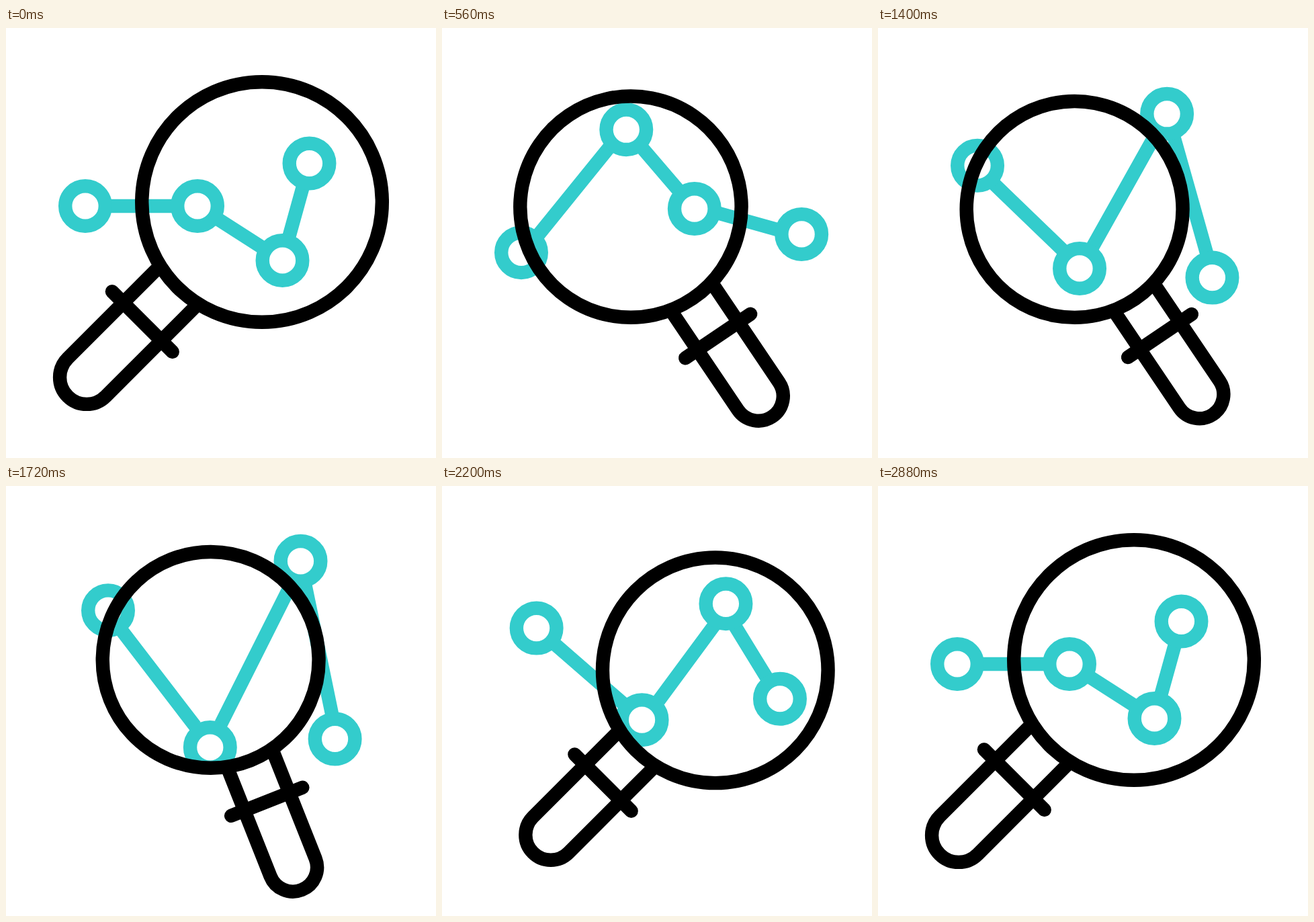
An HTML page without scripts for the animation above (3 s loop, 640 by 640 pixels).

```html
<!DOCTYPE html>
<html lang="en">
<head>
<meta charset="utf-8">
<title>Chart under a magnifier</title>
<style>
  html, body { margin: 0; width: 100%; height: 100%; overflow: hidden; background: #fff; }
  svg { display: block; width: 100vw; height: 100vh; }

  .links, .dot { stroke: #33cccc; stroke-width: 20.4; }
  .links, .dots { fill: none; }
  .dot { fill: #fff; }
  .lens { fill: none; stroke: #000; stroke-width: 20.4; stroke-linecap: round; }
  .lens * { vector-effect: non-scaling-stroke; }
  .lens .grip { fill: #fff; stroke-linecap: butt; }

  .dots, .links, .x, .y, .turn, .size {
    animation: 3s cubic-bezier(.333, 0, .667, 1) infinite;
  }
  .dots { animation-name: dots; }
  .links { animation-name: links; }
  .x { animation-name: x; }
  .y { animation-name: y; }
  .turn { animation-name: turn; }
  .size { animation-name: size; }

  /* the last leg bends, so one ease is split over several keyframes */
  @keyframes dots {
    0%, 2.667%, 94.667%, 100% { d: path("M118 265L285 265L411.5 346L451.5 201.5"); }
    25.333%, 32% { d: path("M118 352.4L271.5 121.6L366.5 249L557 334.4"); }
    50.667% { d: path("M152 185.2L303.8 389L438.5 111.8L489.6 376.5"); }
    60% {
      d: path("M152 185.2L303.8 389L438.5 111.8L489.6 376.5");
      animation-timing-function: cubic-bezier(.333, 0, .667, .394);
    }
    68% {
      d: path("M147.4 196L301.3 372.2L431.1 136L498.2 351.9");
      animation-timing-function: cubic-bezier(.333, .28, .667, .626);
    }
    73.333% {
      d: path("M140.7 211.5L297.6 348.3L422.5 175L503 317");
      animation-timing-function: cubic-bezier(.333, .32, .667, .664);
    }
    78.667% {
      d: path("M133 229.7L293.3 319.9L415.5 226.7L497.4 277");
      animation-timing-function: cubic-bezier(.333, .353, .667, .698);
    }
    84% {
      d: path("M125.7 247L289.2 293L411.9 282L480.7 239.6");
      animation-timing-function: cubic-bezier(.333, .581, .667, 1);
    }
  }
  /* links run from rim to rim, their ends move on their own */
  @keyframes links {
    0%, 2.667%, 94.667%, 100% {
      d: path("M154 265L249 265M315.3 284.4L381.2 326.6M421.1 311.3L441.9 236.2");
    }
    25.333%, 32% {
      d: path("M138 322.4L251.5 151.6M293 150.5L345 220.1M399.4 263.7L524.2 319.7");
    }
    50.667% {
      d: path("M172.7 215.8L281.5 357.5M320 354L424 147M445.3 147.2L485 339");
    }
    60% {
      d: path("M172.7 215.8L281.5 357.5M320 354L424 147M445.3 147.2L485 339");
      animation-timing-function: cubic-bezier(.333, 0, .667, .448);
    }
    73.333% {
      d: path("M167.8 235.2L270.5 324.6M322.5 319.5L405 207.5M436.5 209L484 286.5");
      animation-timing-function: cubic-bezier(.333, .328, .667, .705);
    }
    84% {
      d: path("M160.4 256.7L254.5 283.3M325.1 289.8L376 285.2M442.5 263.1L450.1 258.5");
      animation-timing-function: cubic-bezier(.333, .581, .667, 1);
    }
  }
  @keyframes x {
    0%, 2.667%, 96%, 100% { translate: 310.3px 0; }
    10.667% { translate: 271.3px 0; }
    25.333%, 32% { translate: 378.3px 0; }
    50.667%, 53.333% { translate: 338.3px 0; }
    64% { translate: 336.8px 0; }
    72% { translate: 340.7px 0; }
  }
  @keyframes y {
    0%, 2.667%, 96%, 100% { translate: 0 329.7px; }
    8% { translate: 0 312.5px; animation-timing-function: cubic-bezier(.333, .333, .667, 1); }
    25.333%, 32% { translate: 0 351.8px; }
    50.667%, 53.333% { translate: 0 343.6px; }
    64% { translate: 0 340.3px; }
    72% { translate: 0 340.8px; }
  }
  @keyframes turn {
    0%, 2.667%, 69.45%, 100% { rotate: 45deg; }
    13.333%, 53.333% { rotate: -34deg; }
  }
  @keyframes size {
    0%, 2.667%, 80.7%, 100% { scale: 1; }
    25.333%, 68% { scale: .9; }
  }
</style>
</head>
<body>
<svg viewBox="0 0 640 640">
  <marker id="dot" markerUnits="userSpaceOnUse" markerWidth="90" markerHeight="90" overflow="visible">
    <circle class="dot" r="29.8"/>
  </marker>
  <path class="links" d="M154 265L249 265M315.3 284.4L381.2 326.6M421.1 311.3L441.9 236.2"/>
  <path class="dots" d="M118 265L285 265L411.5 346L451.5 201.5"
        marker-start="url(#dot)" marker-mid="url(#dot)" marker-end="url(#dot)"/>
  <g class="x"><g class="y"><g class="turn"><g class="size lens">
    <path class="grip" d="M-40 74V269A40 40 0 0 0 40 269V74"/>
    <path d="M-63.5 152H63.5"/>
    <circle cy="-100" r="178.8"/>
  </g></g></g></g>
</svg>
</body>
</html>
```
